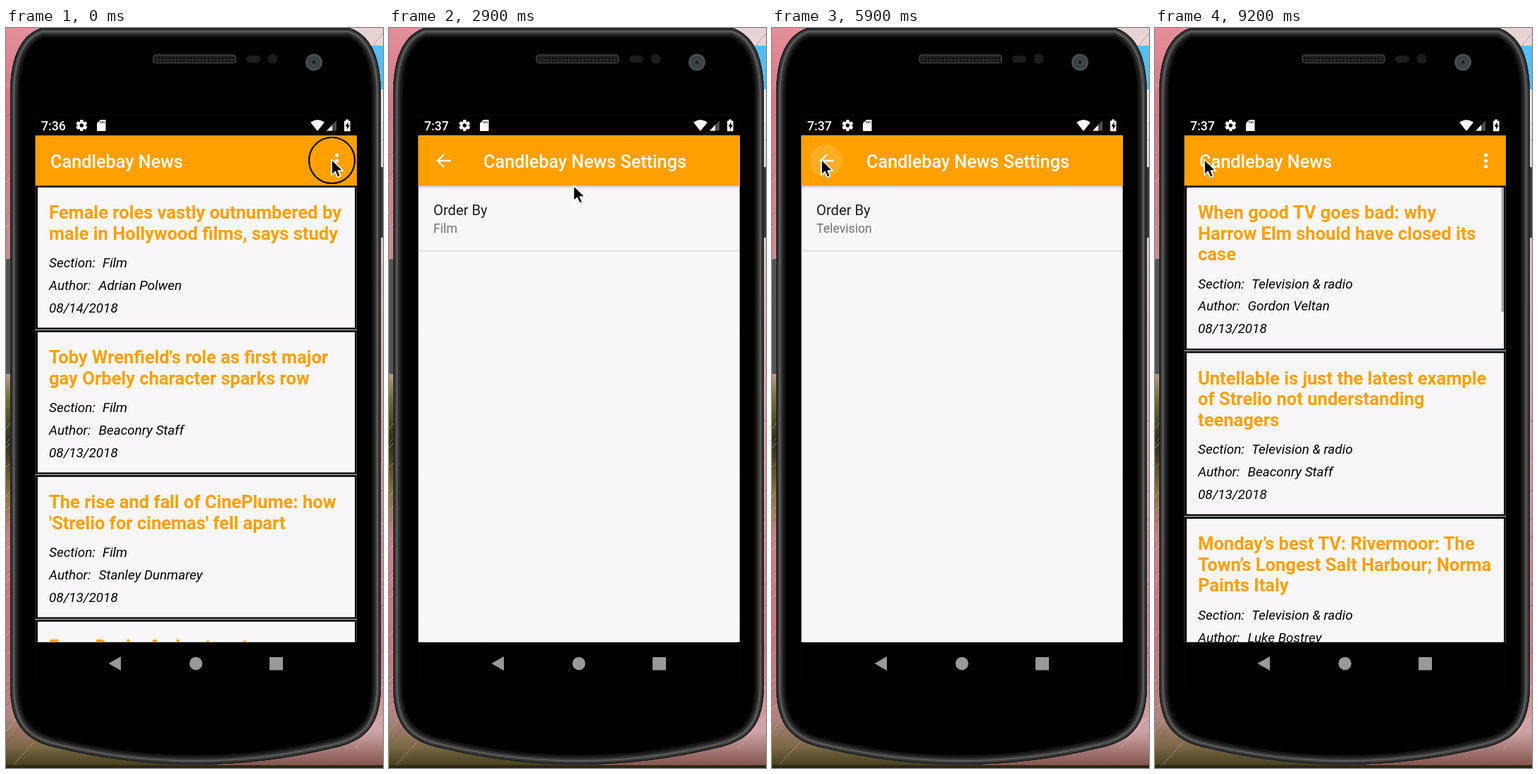
These frames come from a looping animation (535x1048 px, 9300 ms). An HTML page:

```html
<!DOCTYPE html>
<html lang="en">
<head>
<meta charset="utf-8">
<title>News app demo</title>
<style>
html, body { margin: 0; width: 100%; height: 100%; overflow: hidden; background: #000; }
svg { display: block; width: 100%; height: 100%; }
text { font-family: Roboto, "Noto Sans", sans-serif; white-space: pre; }
</style>
</head>
<body>
<svg id="stage" viewBox="0 0 535 1048" preserveAspectRatio="none">
  <defs>
    <linearGradient id="wallL" x2="0" y2="1">
      <stop stop-color="#e3909b"/><stop offset=".1" stop-color="#d87585"/>
      <stop offset=".3" stop-color="#c78b92"/><stop offset=".45" stop-color="#e0b0b5"/>
      <stop offset=".5" stop-color="#737338"/><stop offset=".56" stop-color="#2d2b14"/>
      <stop offset=".63" stop-color="#8c783f"/><stop offset=".69" stop-color="#cb828a"/>
      <stop offset=".82" stop-color="#c87480"/><stop offset=".93" stop-color="#b08580"/>
      <stop offset=".97" stop-color="#7d6a48"/><stop offset="1" stop-color="#3f3a18"/>
    </linearGradient>
    <linearGradient id="wallR" x2="0" y2="1">
      <stop stop-color="#e6d3d2"/><stop offset=".12" stop-color="#e4dede"/>
      <stop offset=".35" stop-color="#d8bcbf"/><stop offset=".6" stop-color="#d79aa2"/>
      <stop offset=".85" stop-color="#c98088"/><stop offset=".95" stop-color="#cfa4a6"/>
      <stop offset="1" stop-color="#7c5048"/>
    </linearGradient>
    <linearGradient id="fall" x2="0" y2="1">
      <stop stop-opacity=".2"/><stop offset="1" stop-opacity="0"/>
    </linearGradient>
    <pattern id="mesh" width="5" height="5" patternUnits="userSpaceOnUse">
      <rect width="5" height="5" fill="#262626"/><circle cx="2.5" cy="2.5" r="1.6" fill="#0c0c0c"/>
    </pattern>
    <filter id="soft" x="-20%" y="-20%" width="140%" height="150%"><feGaussianBlur stdDeviation="7"/></filter>
    <path id="body" d="M6 95C6 50 16 12 50 0H488C522 12 532 50 532 95V930C532 985 513 1010 463 1020Q368 1043 269 1043T75 1020C25 1010 6 985 6 930Z"/>
    <clipPath id="bodyClip"><use href="#body"/></clipPath>
    <clipPath id="view"><rect x="41.8" y="152.4" width="455.8" height="717.4"/></clipPath>
    <clipPath id="menuClip"><rect x="245" y="158" width="247" height="60" rx="2"/></clipPath>
    <clipPath id="rowClip"><rect x="74" y="450" width="391" height="60"/></clipPath>
  </defs>
  <g id="wall"></g>
  <g id="phone"></g>
  <g clip-path="url(#view)">
    <g id="home">
      <rect x="40" y="150" width="460" height="722" fill="#f9f7fa"/>
      <g id="listA"></g>
      <g id="listB"></g>
      <path id="spin" fill="none" stroke="#8b8b8b" stroke-width="5"/>
      <g id="homeBar"></g>
    </g>
    <g id="menu">
      <rect x="245" y="163" width="247" height="62" rx="2" opacity=".3" filter="url(#soft)"/>
      <rect x="245" y="158" width="247" height="60" rx="2" fill="#fcfafc"/>
      <circle id="menuInk" cy="188" fill="#d2d2d2" clip-path="url(#menuClip)"/>
    </g>
    <g id="prefs"></g>
    <rect id="dim" x="40" y="150" width="460" height="722"/>
    <g id="dialog">
      <rect x="70" y="330" width="399" height="384" rx="4" opacity=".35" filter="url(#soft)"/>
      <rect x="74" y="321" width="391" height="380" rx="2.5" fill="#fff"/>
      <circle id="rowInk" cx="195" cy="475" fill="#e0e0e0" clip-path="url(#rowClip)"/>
    </g>
  </g>
  <circle id="ring" r="32.5" fill="none" stroke="#000" stroke-width="2.2"/>
  <path id="cursor" d="M0 0V22.4L5.1 17.7L8.7 25.6L12.7 23.9L9.300 16.200H16.400Z" stroke="#fff" stroke-width="1.7" stroke-linejoin="round"/>
</svg>
<script>
const LOOP = 9300, ORANGE = "#ffa000", GRAY = "#8c8c8c", INK = "#1d1c1d", PAPER = "#f9f7fa";
const $ = id => document.getElementById(id);
const add = (id, html) => $(id).insertAdjacentHTML("beforeend", html);
const set = (id, attrs) => { for (const k in attrs) $(id).setAttribute(k, attrs[k]); };
const show = (id, on) => set(id, { visibility: on ? "visible" : "hidden" });
const ramp = (t, a, b) => Math.min(1, Math.max(0, (t - a) / (b - a)));
const smooth = x => x * x * (3 - 2 * x);
const rise = x => 1 - (1 - x) ** 3;

const rect = (x, y, w, h, fill, more = "") =>
  `<rect x="${x}" y="${y}" width="${w}" height="${h}" fill="${fill}" ${more}/>`;
const dot = (x, y, r, fill, more = "") => `<circle cx="${x}" cy="${y}" r="${r}" fill="${fill}" ${more}/>`;
const text = (x, y, str, size, fill, weight = 400, more = "") =>
  `<text x="${x}" y="${y}" font-size="${size}" fill="${fill}" font-weight="${weight}" ${more}>${str.replace("&", "&amp;")}</text>`;
const bar = (x, title) =>
  rect(40, 223, 460, 5, "url(#fall)") + rect(40, 150, 460, 73.3, ORANGE) + text(x, 198, title, 25.28, "#fff", 500);

function drawWall() {
  let seed = 7;
  const rnd = () => (seed = seed * 16807 % 2147483647) / 2147483647;
  let html = rect(0, 0, 300, 1048, "url(#wallL)") + rect(300, 0, 235, 1048, "url(#wallR)");
  for (let i = 0; i < 90; i++) {
    const y = rnd() * 1060, left = rnd() < .6, x = left ? 0 : 495;
    html += `<path d="M${x} ${y}l40 ${-20 - rnd() * 40}" stroke="${rnd() < .6 ? "#f3c6cb" : "#9c4f58"}" opacity=".4"/>`;
  }
  html += rect(508, 25, 27, 62, "#55bdf0") + rect(520, 87, 15, 45, "#e9e6e6");
  html += rect(0, 1044, 535, 4, "#2d2815");
  add("wall", html);
}

function drawPhone() {
  const rim = [["#161616", 26], ["#303030", 19], ["#5b5b5b", 13], ["#3a3a3a", 8], ["#1b1b1b", 3]];
  let html = rect(0, 327, 8, 163, "#555", 'rx="2"') + rect(530, 197, 5, 100, "#3a3a3a");
  html += '<g clip-path="url(#bodyClip)"><use href="#body"/>' +
    rim.map(([c, w]) => `<use href="#body" fill="none" stroke="${c}" stroke-width="${w}"/>`).join("") + "</g>";
  html += rect(209, 38, 117, 11.5, "url(#mesh)", 'rx="4" stroke="#3e3e3e" stroke-width="1.5"');
  html += rect(341, 39, 20, 10, "#1d1d1d", 'rx="5"') + dot(378.5, 43.5, 7, "#1c1c1c");
  html += dot(437, 48.5, 12, "#4b4b4d") + dot(437, 48.5, 8.5, "#343a40") +
    dot(437, 48.5, 5, "none", 'stroke="#5b6268"') + dot(437, 48.5, 2, "#15181c");
  html += rect(42, 123, 455, 808, "#000", 'stroke="#090909"');

  html += '<text id="clock" x="50" y="144.5" font-size="17.7" font-weight="500" fill="#fff"></text>';
  for (let a = 0; a < 180; a += 60)
    html += rect(105, 130, 4.6, 16, "#fff", `rx="1" transform="rotate(${a} 107.3 138)"`);
  html += dot(107.3, 138, 6, "#fff") + dot(107.3, 138, 2.7, "#000");
  html += '<path d="M134 130h7.5v16H129V135Z" fill="#fff"/><path d="M134 132v3m2.5-3v3m2.5-3v3" stroke="#000"/>';
  html += '<path d="M432 133.5Q442 126.5 452 133.5L442 146Z" fill="#fff"/>';
  html += '<path d="M469 131V145.5H455Z" fill="#4c4c4c"/><path d="M463 137.2V145.5H455Z" fill="#fff"/>';
  html += '<path d="M480 131.5h2.2v-2h3.6v2h2.7v14.7H480Z" fill="#fff"/><path d="M485.5 133l-4 6.5h2.4v4.5l4-6.5h-2.4Z"/>';

  html += '<path d="M145.5 900L163 890V910Z" fill="#999"/>' + dot(269.5, 900, 9.2, "#999") + rect(374, 891, 19, 18.5, "#999", 'rx="1"');
  add("phone", html);
}

function drawList(id, section, items) {
  let y = 223, html = rect(40, 223, 460, 650, "#0a0a0a");
  const italic = 'font-style="italic"';
  for (const [author, date, ...lines] of items) {
    const extra = 29.6 * lines.length, h = 145.8 + extra;
    html += rect(45, y + 2.8, 450, h - 6.4, PAPER) + rect(40, y + h - 1.2, 460, 1.3, "#b9b8ba");
    lines.forEach((s, i) => html += text(61, y + 47 + 29.6 * i, s, 25.55, ORANGE, 700));
    const base = y + 56.8 + extra;
    const row = (x, dy, s) => html += text(x, base + dy, s, 18.96, "#000", 400, italic);
    row(61, 0, "Section:"); row(137, 0, section);
    row(61, 31.8, "Author:"); row(131.5, 31.8, author);
    row(61, 63.6, date);
    y += h;
  }
  add(id, html);
}

function drawPages() {
  drawList("listA", "Film", [
    ["Adrian Polwen", "08/14/2018", "Female roles vastly outnumbered by", "male in Hollywood films, says study"],
    ["Beaconry Staff", "08/13/2018", "Toby Wrenfield's role as first major", "gay Orbely character sparks row"],
    ["Stanley Dunmarey", "08/13/2018", "The rise and fall of CinePlume: how", "'Strelio for cinemas' fell apart"],
    ["Beaconry Staff", "08/13/2018", "From Dusk of a Lantern to", "a quiet life"]
  ]);
  drawList("listB", "Television & radio", [
    ["Gordon Veltan", "08/13/2018", "When good TV goes bad: why", "Harrow Elm should have closed its", "case"],
    ["Beaconry Staff", "08/13/2018", "Untellable is just the latest example", "of Strelio not understanding", "teenagers"],
    ["Luke Bostrey", "08/13/2018", "Monday’s best TV: Rivermoor: The", "Town’s Longest Salt Harbour; Norma", "Paints Italy"]
  ]);
  add("listB", rect(491.5, 226, 3.5, 176, "#aaa9ab"));
  add("homeBar", bar(63, "Candlebay News") + [180, 188, 196].map(y => dot(469.5, y, 2.6, "#fff")).join(""));
  add("menu", text(265, 195.5, "Settings", 20.22, INK));

  add("prefs", rect(40, 150, 460, 722, PAPER) + rect(40, 223, 460, 92, "#000", 'id="rowPress"') +
    bar(134, "Candlebay News Settings") + '<circle id="backInk" cx="76.5" cy="188" fill="#fff"/>' +
    '<path d="M88 188H69.5M78 179L69 188L78 197" fill="none" stroke="#fff" stroke-width="2.4"/>' +
    text(63, 265, "Order By", 20.22, INK) + '<text id="choice" x="63" y="290" font-size="17.7" fill="#747274"></text>' +
    rect(40, 315, 460, 1.3, "#d3d1d4"));

  let html = text(105, 371, "Order By", 25.28, INK, 500) + text(368.5, 672.5, "CANCEL", 17.7, GRAY, 500);
  ["Film", "Television", "Music", "Theater"].forEach((name, i) => {
    const y = 418.5 + 60.6 * i;
    html += dot(119, y, 11.4, "none", `id="radio${i}" stroke-width="2.5"`) + dot(119, y, 6.4, GRAY, `id="pip${i}"`) +
      text(165, y + 9, name, 22.75, "#2b2a2b");
  });
  add("dialog", html);
}

// time, x, y
const path = [[0, 462, 186], [700, 462, 186], [1700, 337, 185], [2650, 337, 185], [3200, 164, 272],
  [3600, 164, 272], [4200, 194, 473], [5000, 194, 473], [5600, 70, 186], [LOOP, 70, 186]];
const clicks = [0, 2180, 3260, 4400, 5700];

function pointer(t) {
  const i = path.findIndex(p => p[0] > t);
  const [a, x, y] = path[i - 1], [b, u, v] = path[i], k = smooth(ramp(t, a, b));
  return [x + (u - x) * k, y + (v - y) * k];
}

function spinner(t) {
  const q = (t - 7220) / 1333, n = Math.floor(q), f = q - n;
  const turn = 141.5 + n * 270 + (t - 7300) * .162;
  const tail = turn + 270 * smooth(ramp(f, .5, 1));
  const head = turn + 14 + 270 * smooth(ramp(f, 0, .5));
  const at = d => `${269.5 + 23.2 * Math.cos(d * Math.PI / 180)} ${546.2 + 23.2 * Math.sin(d * Math.PI / 180)}`;
  set("spin", { d: `M${at(tail)}A23.2 23.2 0 ${head - tail > 180 ? 1 : 0} 1 ${at(head)}` });
}

function draw(t) {
  $("clock").textContent = t < 1200 ? "7:36" : "7:37";

  const back = t >= 6100, loaded = t >= 8500;
  show("listA", !back);
  show("listB", loaded);
  show("spin", back && !loaded);
  spinner(t);

  const open = rise(ramp(t, 250, 450)), ink = rise(ramp(t, 2200, 2540));
  set("menu", {
    opacity: open * (1 - ramp(t, 2480, 2600)),
    transform: `translate(492 158) scale(${.6 + .4 * open}) translate(-492 -158)`
  });
  set("menuInk", { cx: 337 + 33 * ink, r: 127 * ink });

  const enter = rise(ramp(t, 2550, 2800)), leave = ramp(t, 6100, 6350);
  set("prefs", { opacity: enter * (1 - leave), transform: `translate(0 ${56 * (1 - enter + leave * leave)})` });
  set("rowPress", { opacity: .08 * ramp(t, 3260, 3400) * (1 - ramp(t, 4400, 4700)) });
  set("backInk", { r: 23 * rise(ramp(t, 5700, 5850)), opacity: .14 * (1 - ramp(t, 5950, 6150)) });

  const tv = t >= 4500;
  $("choice").textContent = t < 4700 ? "Film" : "Television";
  set("dim", { opacity: .63 * ramp(t, 3350, 3550) * (1 - ramp(t, 4700, 4950)) });
  const pop = rise(ramp(t, 3350, 3550));
  set("dialog", {
    opacity: pop * (1 - ramp(t, 4700, 4850)),
    transform: `translate(269.5 511) scale(${.9 + .1 * pop}) translate(-269.5 -511)`
  });
  set("rowInk", { r: 290 * rise(ramp(t, 4400, 4650)), opacity: 1 - ramp(t, 4600, 4800) });
  for (let i = 0; i < 4; i++) {
    const on = i === (tv ? 1 : 0);
    set("radio" + i, { stroke: on ? GRAY : "#6f6e70" });
    show("pip" + i, on);
  }

  const [x, y] = pointer(t);
  set("cursor", { transform: `translate(${x} ${y})` });
  set("ring", { cx: x + .5, cy: y + 1.5 });
  show("ring", clicks.some(c => t >= c && t < c + 140));
}

drawWall();
drawPhone();
drawPages();
const start = performance.now();
(function tick() {
  draw((performance.now() - start) % LOOP);
  requestAnimationFrame(tick);
})();
</script>
</body>
</html>
```
